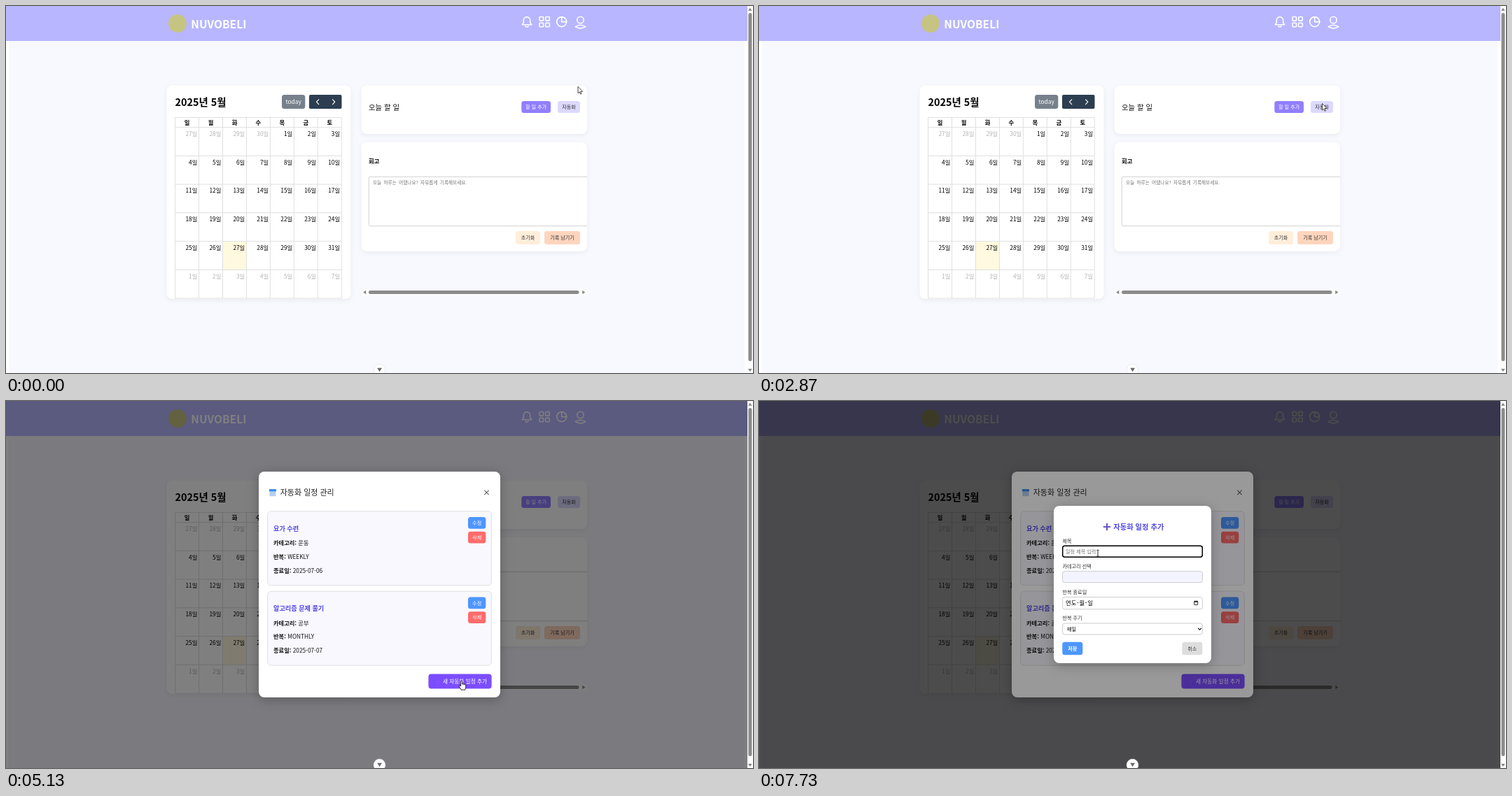
An HTML page for the animation above (8000 ms loop, 1067 by 525 pixels).

```html
<!DOCTYPE html>
<html lang="ko">
<head>
<meta charset="utf-8">
<title>Planner</title>
<style>
  html, body { margin: 0; width: 100%; height: 100%; overflow: hidden; background: #fff; }
  svg { display: block; width: 1067px; height: 525px; }
  text { font-family: "Noto Sans CJK KR", "Noto Sans KR", "Noto Sans CJK", "Noto Sans", sans-serif; white-space: pre; }
  .mono { font-family: "Noto Sans Mono CJK KR", "Noto Sans CJK KR", "Noto Sans Mono", monospace; }
  .b { font-weight: 700; }
  .m { font-weight: 500; }
  .mid { text-anchor: middle; }
  .end { text-anchor: end; }
  .card { filter: drop-shadow(0 2px 3px rgba(0, 0, 0, .06)); }
  .pop { filter: drop-shadow(0 3px 8px rgba(0, 0, 0, .25)); }
  .line { fill: none; stroke: #fff; stroke-width: 1.6; stroke-linejoin: round; stroke-linecap: round; }
</style>
</head>
<body>
<svg id="stage" viewBox="0 0 1067 525" xmlns="http://www.w3.org/2000/svg">
  <g id="page"></g>
  <g id="manage"></g>
  <g id="create"></g>
  <g id="chrome"></g>
  <g id="cursor">
    <path id="arrow" d="M0 0V9.4L2.1 7.5L3.5 10.8L5 10.2L3.6 7H6.6Z" fill="#fff" stroke="#000" stroke-width=".7"/>
    <path id="hand" d="M-1 1C-1-.3 1-.3 1 1V5C1 4 2.8 4.1 2.8 5.2C2.9 4.4 4.6 4.6 4.6 5.7C4.8 5 6.2 5.2 6.2 6.5V9.5C6.2 10.8 5.4 11.3 5.3 13H-.4C-.5 11.5-2.5 10-3.2 8C-3.6 6.8-2.4 6.2-1 7.8Z" fill="#fff" stroke="#000" stroke-width=".8"/>
    <path id="beam" d="M-1.7-4.3H-.4L0-4L.4-4.3H1.7M0-4V4M-1.7 4.3H-.4L0 4L.4 4.3H1.7" fill="none" stroke="#111" stroke-width=".9"/>
  </g>
</svg>
<script>
const $ = id => document.getElementById(id);

// Text is placed by its visual middle, not its baseline.
const text = (x, y, s, size, fill = '#000', cls = '') =>
  `<text x="${x}" y="${y + size * .37}" font-size="${size}" fill="${fill}" class="${cls}">${s}</text>`;
const rect = (x, y, w, h, r, fill, more = '') =>
  `<rect x="${x}" y="${y}" width="${w}" height="${h}" rx="${r}" fill="${fill}" ${more}/>`;
const path = (d, more) => `<path d="${d}" ${more}/>`;
const button = (x, y, w, h, fill, label, color, size = 7.1, cls = 'm') =>
  rect(x, y, w, h, 3.5, fill) + text(x + w / 2, y + h / 2 + .2, label, size, color, cls + ' mid');
const plus = (x, y, r, color) =>
  path(`M${x - r} ${y}h${2 * r}M${x} ${y - r}v${2 * r}`, `stroke="${color}" stroke-width="${r * .5}" stroke-linecap="round"`);
const shade = alpha => rect(0, 0, 1059, 525, 0, '#000', `opacity="${alpha}"`);

function header() {
  const squares = [[762, 15.5], [770.7, 15.5], [762, 24.2], [770.7, 24.2]];
  return rect(0, 0, 1059, 50, 0, '#b7b6ff') +
    '<circle cx="245" cy="25" r="13" fill="#c6c482"/>' +
    text(264.3, 26, 'NUVOBELI', 15.6, '#fff', 'b') +
    '<g class="line">' +
    path('M737.3 26.7h13.4l-2-2.8v-3.6a4.7 4.7 0 0 0-9.4 0v3.6zM742 28.9a2.1 1.6 0 0 0 4 0') +
    squares.map(([x, y]) => rect(x, y, 5.6, 5.6, 1, 'none')).join('') +
    '<circle cx="793.7" cy="22.6" r="7"/>' + path('M793.7 15.6v7h7') +
    '<circle cx="820.5" cy="20" r="4.7"/>' + path('M813.2 29.6q7.3-4.8 14.6 0q-7.3 4.6-14.6 0z') +
    '</g>';
}

function calendar() {
  const left = 241.6, top = 173.6, cw = 33.95, rh = 40.75;
  const right = left + 7 * cw, bottom = top + 6 * rh;
  let out = rect(229.5, 113.5, 263, 305.5, 8, '#fff', 'class="card"') +
    text(241.5, 137.5, '2025년 5월', 14.4, '#000', 'b') +
    button(394, 127, 33.3, 20, '#76818c', 'today', '#fff', 8.3, '') +
    rect(433, 127, 46.5, 20, 2, '#2c3e50') +
    path('M446.7 133.8l-3.2 3.4 3.2 3.4M466.6 133.8l3.2 3.4-3.2 3.4', 'class="line" style="stroke-width:1.2"') +
    rect(left + 2 * cw, top + 4 * rh, cw, rh, 0, '#fffadf');
  let grid = `M${left} 159.5H${right}`;
  for (let i = 0; i < 8; i++) grid += `M${left + i * cw} 159.5V${bottom}`;
  for (let i = 0; i < 7; i++) grid += `M${left} ${top + i * rh}H${right}`;
  out += path(grid, 'fill="none" stroke="#ddd" stroke-width=".9"');
  [...'일월화수목금토'].forEach((d, i) => { out += text(left + (i + .5) * cw, 167, d, 8.3, '#000', 'b mid'); });
  for (let i = 0; i < 42; i++) {
    const n = i - 3, inside = n > 0 && n < 32;
    const day = n < 1 ? n + 30 : n > 31 ? n - 31 : n;
    out += text(left + (i % 7 + 1) * cw - 2.2, top + Math.floor(i / 7) * rh + 9.2, day + '일', 8.3, inside ? '#000' : '#b3b3b3', 'end');
  }
  return out;
}

function today() {
  return rect(507.5, 113.5, 322.5, 69.5, 8, '#fff', 'class="card"') +
    text(518, 145, '오늘 할 일', 10.4, '#111', 'm') +
    button(736.3, 136, 41.7, 17, '#917fff', '할 일 추가', '#fff') +
    button(788, 136, 32, 17, '#dcd9ff', '자동화', '#333', 7.1, '') +
    rect(507.5, 195, 322.5, 156, 8, '#fff', 'class="card"') +
    text(518, 222, '회고', 8.3, '#000', 'b') +
    path('M830 244.3H520.5q-2.2 0-2.2 2.2V312.5q0 2.2 2.2 2.2H830', 'fill="none" stroke="#ccc" stroke-width=".9"') +
    text(524, 253, '오늘 하루는 어땠나요? 자유롭게 기록해보세요.', 6.64, '#757575', 'mono') +
    button(728, 322, 35, 19, '#ffeeda', '초기화', '#333', 7.1, '') +
    button(769, 322, 51, 19, '#ffd5bd', '기록 남기기', '#333', 7.1, '') +
    rect(508, 405, 322, 9, 0, '#fcfcfc') +
    rect(518, 407, 300.5, 5, 2.5, '#8b8b8b') +
    path('M514.2 406.7v5.6l-4-2.8zM823.3 406.7v5.6l4-2.8z', 'fill="#858585"');
}

function task(y, title, category, repeat, until) {
  const row = (dy, key, value) => text(382, y + dy, `<tspan class="b">${key}:</tspan> ${value}`, 8.25, '#111');
  return rect(373.7, y, 319.6, 106, 5, '#f9f8ff', 'stroke="#ddd" stroke-width=".9"') +
    text(382, y + 24.6, title, 9.15, '#4f46e5', 'b') +
    row(45.5, '카테고리', category) + row(65.2, '반복', repeat) + row(85, '종료일', until) +
    button(660, y + 8.3, 25.3, 16.7, '#4d96ff', '수정', '#fff') +
    button(660, y + 29, 25.3, 16.7, '#ff6b6b', '삭제', '#fff');
}

function manageDialog() {
  let icon = rect(375.8, 126, 10.2, 10.6, 1, '#dfeaf7') + rect(375.8, 126, 10.2, 3.4, 1, '#3f8ee8');
  for (let i = 0; i < 12; i++) icon += rect(377 + i % 4 * 2.1, 130.4 + Math.floor(i / 4) * 2, 1.4, 1.2, 0, '#7da9dc');
  return shade(.5) + rect(361, 101, 345, 323, 8, '#fff', 'class="pop"') + icon +
    text(391.7, 131, '자동화 일정 관리', 11, '#222', 'm') +
    path('M683.3 127.7l6.4 6.4m0-6.4l-6.4 6.4', 'stroke="#666" stroke-width="1.2"') +
    task(157.7, '요가 수련', '운동', 'WEEKLY', '2025-07-06') +
    task(272.2, '알고리즘 문제 풀기', '공부', 'MONTHLY', '2025-07-07') +
    rect(603.4, 390.5, 90.2, 21, 4, '#7c4dff') + plus(617, 401.5, 2.4, '#8458f2') +
    text(624, 401.3, '새 자동화 일정 추가', 7.7, '#fff', 'm');
}

function createDialog() {
  const field = (y, h, fill = '#fff') => rect(433.6, y, 199.8, h, 3, fill, 'stroke="#c8c8cc" stroke-width=".9"');
  const label = (y, s) => text(433.4, y, s, 7.15, '#333');
  return shade(.4) + rect(421, 150, 225, 225, 8, '#fff', 'class="pop"') +
    plus(497, 180, 4.3, '#6a54c8') + text(506.3, 179.7, '자동화 일정 추가', 10.3, '#4f46e5', 'b') +
    label(200, '제목') + field(207, 16.3) + text(438, 215.2, '일정 제목 입력', 7.15, '#757575') +
    '<g id="focus">' + rect(433.7, 207.3, 199.6, 16, 3, 'none', 'stroke="#000" stroke-width="1.5"') + '</g>' +
    rect(438, 211, .8, 9, 0, '#000', 'id="caret"') +
    label(236.5, '카테고리 선택') + field(243.7, 16, '#f3f4ff') +
    label(273, '반복 종료일') + field(280.5, 17.3) +
    text(438, 289, '연도-월-일', 8.3, '#000', 'mono') +
    rect(621.7, 286.6, 5, 5, .4, 'none', 'stroke="#000" stroke-width=".8"') +
    path('M621.5 287.2h5.4M622.9 285.6v1M625.5 285.6v1', 'stroke="#000" stroke-width="1"') +
    label(310.5, '반복 주기') + field(318, 16) + text(440, 326, '매일', 7.15) +
    path('M627.2 325l2.3 2.3 2.3-2.3', 'fill="none" stroke="#000" stroke-width="1.1"') +
    button(433.3, 344.7, 29, 18.6, '#4d96ff', '저장', '#fff', 7.15, 'b') +
    button(604.3, 344.7, 29, 18.6, '#ddd', '취소', '#333', 7.15, '');
}

$('page').innerHTML = rect(0, 0, 1059, 525, 0, '#fff') + rect(4, 50, 1051, 475, 0, '#f8f8ff') +
  header() + calendar() + today();
$('manage').innerHTML = manageDialog();
$('create').innerHTML = createDialog();
$('chrome').innerHTML = rect(1059, 0, 8, 525, 0, '#fcfcfc') + rect(1060.4, 10, 5, 498, 2.5, '#8b8b8b') +
  path('M1060 6.7h5.6l-2.8-4zM1060 519h5.6l-2.8 4z', 'fill="#858585"') +
  '<circle cx="533.5" cy="520.5" r="8.3" fill="#fff" stroke="#e4e4ea" stroke-width=".8"/>' +
  path('M530.2 517.8h6.8l-3.4 5.4z', 'fill="#6b6b6b"');

const LOOP = 8000, TICK = 1000 / 15;
const PRESS = 2800, MANAGE = 2930, CREATE = 5400, FOCUS = 6200;

// Pointer hot spot: time, x, y
const track = [
  [67, 817, 115.3], [533, 762, 149], [867, 762, 149], [1000, 757, 147], [1267, 757, 147],
  [1533, 804.5, 139.5], [3200, 804.5, 139.5], [4067, 674.3, 384.5], [4133, 673.3, 386], [4200, 673.3, 386],
  [4267, 672.5, 387.3], [4400, 672.5, 387.3], [4467, 659.5, 388.3], [4933, 659.5, 388.3], [5133, 650.5, 400.2],
  [5533, 650.5, 400.2], [5933, 508, 172], [6133, 484, 217.7]
];

function pointerAt(t) {
  const i = track.findIndex(p => p[0] > t);
  if (i < 0) return track[track.length - 1].slice(1);
  if (i === 0) return track[0].slice(1);
  const [t0, x0, y0] = track[i - 1], [t1, x1, y1] = track[i];
  const u = (t - t0) / (t1 - t0), e = u * u * (3 - 2 * u);
  return [x0 + (x1 - x0) * e, y0 + (y1 - y0) * e];
}

function pointerKind(t, x, y) {
  const over = (l, top, r, b) => x > l && x < r && y > top && y < b;
  if (t < PRESS) return over(736, 136, 778, 153) || over(788, 136, 820, 153) ? 'hand' : 'arrow';
  if (t < CREATE) return t > MANAGE && over(603, 390, 694, 412) ? 'hand' : 'arrow';
  return over(433, 207, 634, 224) ? 'beam' : 'arrow';
}

const show = (id, on) => { $(id).style.display = on ? '' : 'none'; };

function draw(now) {
  const t = now % LOOP;
  const [x, y] = pointerAt(Math.floor((t + 5) / TICK) * TICK);
  const kind = pointerKind(t, x, y);
  $('cursor').setAttribute('transform', `translate(${x} ${y})`);
  ['arrow', 'hand', 'beam'].forEach(k => show(k, k === kind));
  show('manage', t >= MANAGE);
  show('create', t >= CREATE);
  show('focus', t >= FOCUS);
  show('caret', t >= FOCUS && Math.floor((t - FOCUS) / 505) % 2 === 0);
  requestAnimationFrame(() => draw(performance.now() - start));
}

const start = performance.now();
draw(0);
</script>
</body>
</html>
```
